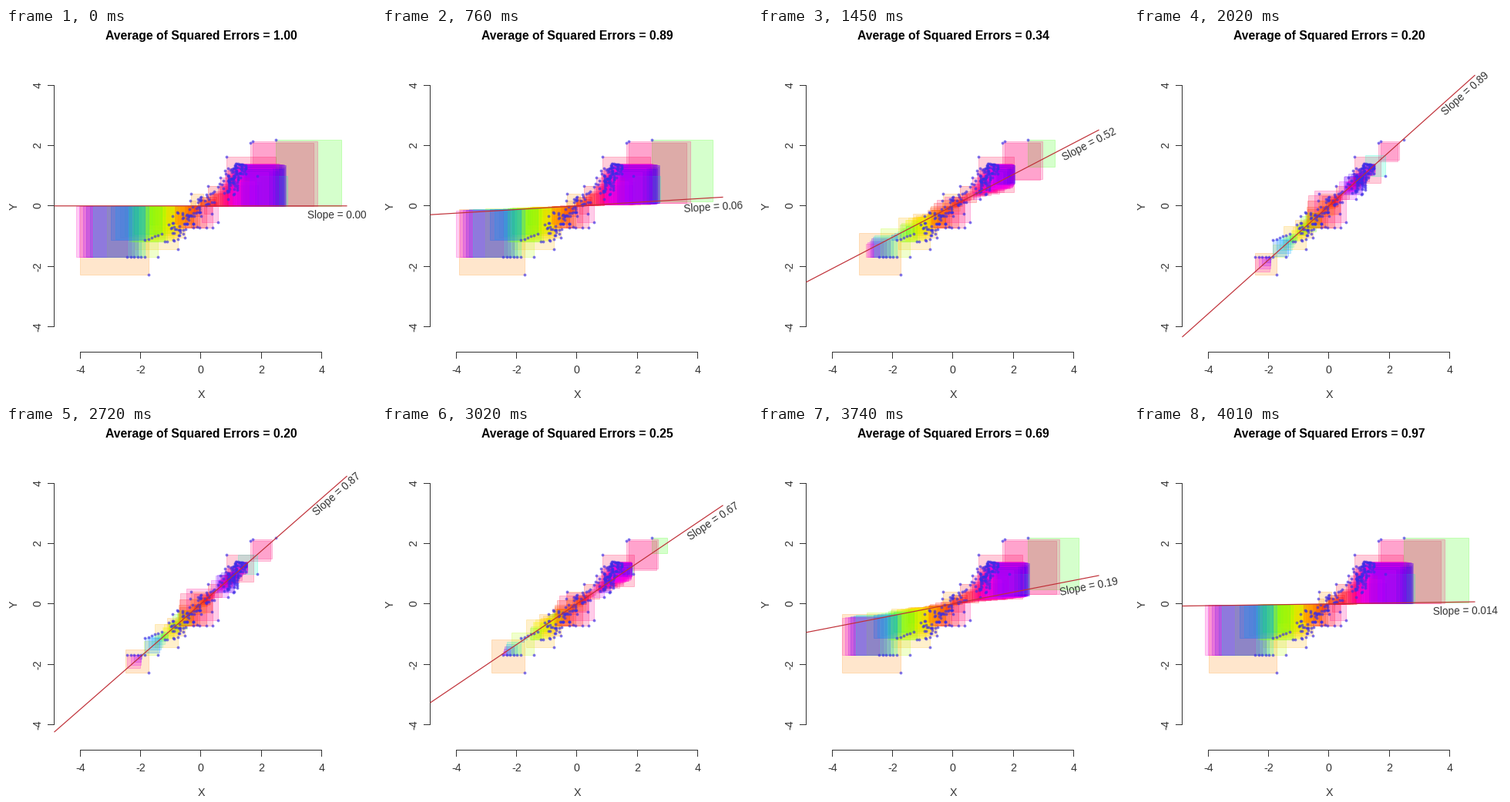
Recreate the animation shown at these times as a matplotlib script. Size 480x480 px, loop 4040 ms.

```python
import numpy as np
import matplotlib.pyplot as plt
from matplotlib.animation import FuncAnimation
from matplotlib.collections import LineCollection, PolyCollection
from matplotlib.colors import hsv_to_rgb

SIZE, DPI = 480, 100
PX = 72 / DPI                       # one pixel in points
UNIT, CX, CY = 39.15, 252.7, 230.8  # pixels per unit and pixel origin
RHO = 0.8944                        # best slope of the standardised data
DT, LOOP = 10, 4040
HOLD, STEP_MS, STEP = 700, 30, 0.02
DOWN = 2020 + HOLD                  # time at which the line starts back
AXIS_X, AXIS_Y, TICK = 62.5, 420.5, 8
INK = "#333333"

plt.rcParams["font.family"] = "Liberation Sans"


def data(px, py):
    """Pixel position to data units."""
    return (px - CX) / UNIT, (CY - py) / UNIT


def make_points():
    """A tilted cloud in three clumps, two loose rows and a few outliers."""
    rng = np.random.default_rng(5)
    x = np.concatenate([
        np.clip(rng.normal(1.18, 0.22, 105), 0.6, 1.5),
        np.clip(rng.normal(-0.6, 0.32, 60), -1.3, 0.0),
        rng.uniform(-0.3, 0.7, 32),
    ])
    y = RHO * x + np.clip(rng.normal(0, 0.26, x.size), -0.6, 0.5)
    y = np.minimum(y, 1.4 + 0.2 * (1.2 - x))

    low_left = np.linspace(-2.44, -1.86, 6)
    mid_left = np.linspace(-1.85, -1.3, 6)
    low_mid = np.linspace(-0.25, 0.4, 4)
    outliers = np.array([(-1.74, -2.27), (1.64, 2.1), (1.72, 2.14),
                         (2.48, 2.18), (0.85, 1.63), (-0.76, -1.43),
                         (-1.42, -1.7), (1.87, 1.0), (0.57, -0.54),
                         (-0.32, 0.4)])
    x = np.concatenate([x, low_left, mid_left, low_mid, outliers[:, 0]])
    y = np.concatenate([y, 0 * low_left - 1.7, 0.4 * mid_left - 0.4,
                        0 * low_mid - 0.72, outliers[:, 1]])
    order = rng.permutation(x.size)
    return x[order], y[order]


def point_colors(x, y):
    """Rainbow hue that turns with x, less for points outside the trend."""
    turn = np.clip(1 - 0.7 * x * (y - RHO * x), 0.1, 1.25)
    hue = 12 - (55 * x + 18 * x * np.abs(x)) * turn
    ones = np.ones_like(hue)
    return hsv_to_rgb(np.column_stack([hue / 360 % 1, ones, ones]))


def slope_at(t):
    if t < HOLD:
        return 0.0
    if t < DOWN:
        return min(STEP * ((t - HOLD) // STEP_MS + 1), RHO)
    return RHO - STEP * ((t - DOWN) // STEP_MS + 1)


def two_digits(v):
    """At least two decimals and two significant digits."""
    return max(f"{v:.2f}", f"{v:.2g}", key=len)


def squares(s):
    r = Y - s * X
    corners = [(X, Y), (X + r, Y), (X + r, s * X), (X, s * X)]
    return np.stack([np.column_stack(c) for c in corners], axis=1)


def label(px, py, text, size=14.2, **kw):
    kw = {"ha": "center", "va": "baseline", "color": INK, **kw}
    return ax.text(*data(px, py), text, fontsize=size * PX, **kw)


def draw_axes():
    ticks = np.arange(-4, 5, 2)
    xs = np.floor(CX + ticks * UNIT) + 0.5
    ys = np.floor(CY - ticks * UNIT) + 0.5
    lines = [[(xs[0], AXIS_Y), (xs[-1], AXIS_Y)],
             [(AXIS_X, ys[0]), (AXIS_X, ys[-1])]]
    for v, px, py in zip(ticks, xs, ys):
        lines.append([(px, AXIS_Y), (px, AXIS_Y + TICK)])
        lines.append([(AXIS_X, py), (AXIS_X - TICK, py)])
        label(px, 448.5, str(v))
        label(41.5, py, str(v), rotation=90, va="center")
    ax.add_collection(LineCollection(
        [[data(*p) for p in line] for line in lines], colors=INK,
        linewidths=PX, capstyle="projecting", snap=False), autolim=False)
    label(253, 479.5, "X")
    label(10.5, 231, "Y", rotation=90, va="center")


X, Y = make_points()
COLORS = point_colors(X, Y)

fig = plt.figure(figsize=(SIZE / DPI, SIZE / DPI), dpi=DPI, facecolor="white")
ax = fig.add_axes([0, 0, 1, 1])
ax.axis("off")
ax.set_xlim(data(0, 0)[0], data(SIZE, 0)[0])
ax.set_ylim(data(0, SIZE)[1], data(0, 0)[1])
draw_axes()

boxes = PolyCollection(
    squares(0), linewidths=PX, zorder=2,
    facecolors=np.column_stack([COLORS, np.full(X.size, 0.2)]),
    edgecolors=np.column_stack([COLORS, np.full(X.size, 0.22)]))
ax.add_collection(boxes, autolim=False)
ax.plot(X, Y, "o", ms=3.8 * PX, mew=0, color="#3a2ce6", alpha=0.65, zorder=3)

ENDS = np.array([data(AXIS_X, 0)[0], data(442.5, 0)[0]])
fit, = ax.plot(ENDS, 0 * ENDS, color="#c03038", lw=1.2 * PX, zorder=4,
               solid_capstyle="butt", snap=False)
title = label(253.5, 15.5, "", 15.8, weight="bold", color="black")
tag = label(429.5, CY, "", 13.6, va="center", zorder=5)
TAG_X = data(429.5, 0)[0]


def update(i):
    s = slope_at(i * DT)
    n = X.size
    mse = (1 - 2 * s * RHO + s * s) * (n - 1) / n
    boxes.set_verts(squares(s))
    fit.set_ydata(s * ENDS)
    title.set_text(f"Average of Squared Errors = {mse:.2f}")
    tag.set_text(f"Slope = {two_digits(s)}")
    tag.set_rotation(np.degrees(np.arctan(s)))
    tag.set_position((TAG_X, s * TAG_X - 12.5 / UNIT))
    return boxes, fit, title, tag


anim = FuncAnimation(fig, update, frames=LOOP // DT, interval=DT,
                     repeat=True, repeat_delay=0, blit=False)
plt.show()
```
